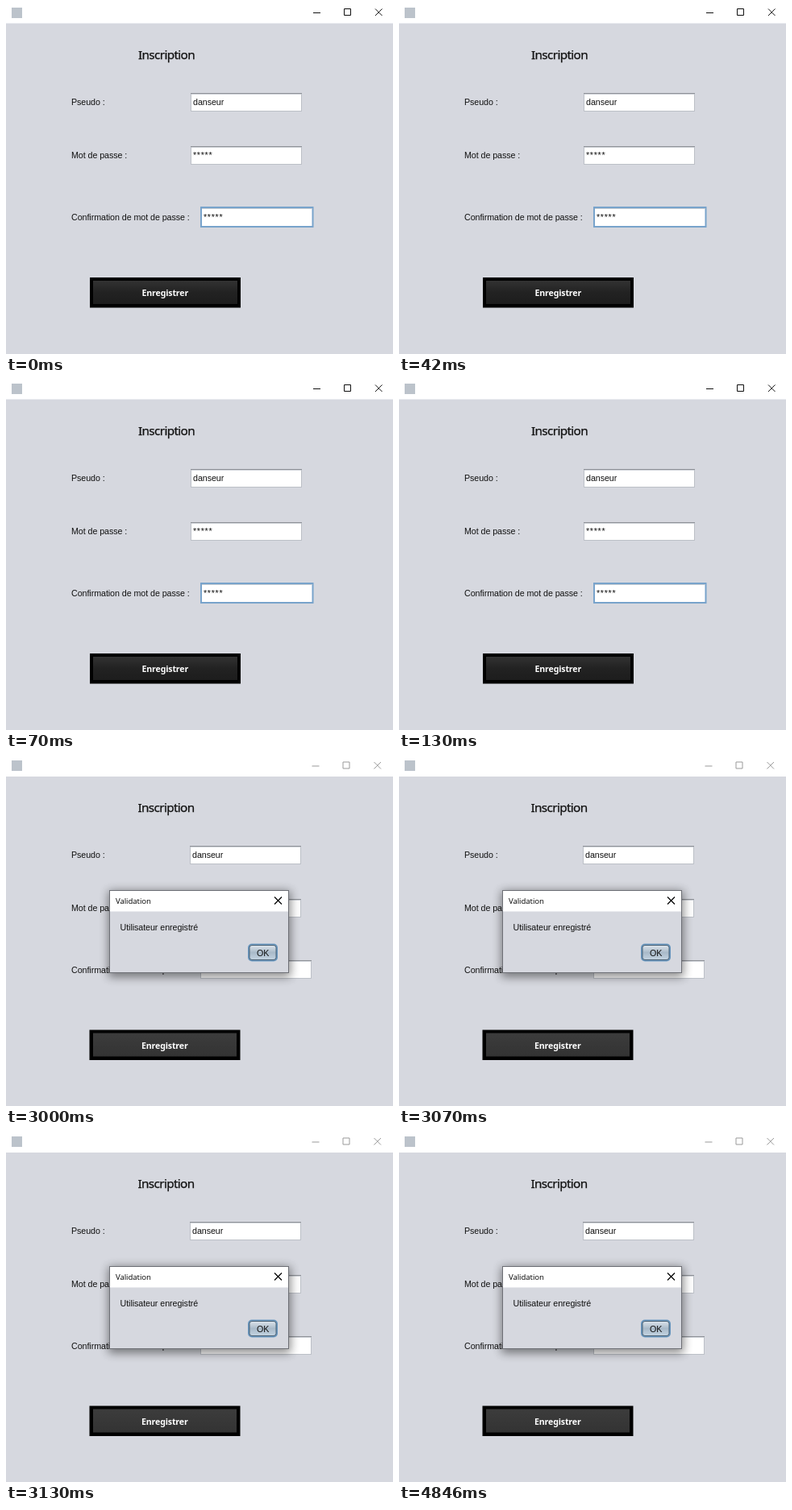
An HTML page for the animation above (5.99 s loop, 480 px wide and 432 px high).

```html
<!DOCTYPE html>
<html lang="fr">
<head>
<meta charset="utf-8">
<title>Inscription</title>
<style>
  html, body { margin: 0; width: 100%; height: 100%; overflow: hidden; background: #d6d8df; }
  svg { display: block; width: 480px; height: 432px; }
  text { font: 10.7px "Liberation Sans", Arial, sans-serif; letter-spacing: -.06px; fill: #111; white-space: pre; }
  .title { font: 15.3px "Noto Sans", "Open Sans", sans-serif; letter-spacing: -.65px; stroke: #111; stroke-width: .25px; }
  .action { font: bold 10.6px "Noto Sans", "Open Sans", sans-serif; letter-spacing: -.15px; fill: #fff; }
  .caption { font: 9.6px "Open Sans", "Noto Sans", sans-serif; fill: #000; }
  .secret { letter-spacing: .7px; }
  .controls { fill: none; stroke: #111; }
  .idle .controls { stroke: #999; }

  /* The dialog opens 3000 ms into the 5990 ms loop */
  .form { animation: form 5990ms step-end infinite; }
  .saved { animation: saved 5990ms step-end infinite; }
  @keyframes form { 0% { visibility: visible } 50.0835%, 100% { visibility: hidden } }
  @keyframes saved { 0% { visibility: hidden } 50.0835%, 100% { visibility: visible } }
</style>
</head>
<body>
<svg viewBox="0 0 480 432">
  <defs>
    <linearGradient id="pressed" x2="0" y2="1">
      <stop offset="0" stop-color="#323232"/>
      <stop offset=".5" stop-color="#222"/>
      <stop offset="1" stop-color="#1d1d1d"/>
    </linearGradient>
    <linearGradient id="released" x2="0" y2="1">
      <stop offset="0" stop-color="#3c3c3c"/>
      <stop offset="1" stop-color="#333"/>
    </linearGradient>
    <linearGradient id="ok" x2="0" y2="1">
      <stop offset="0" stop-color="#e3e9ef"/>
      <stop offset=".5" stop-color="#a9bac9"/>
      <stop offset="1" stop-color="#c6d6e4"/>
    </linearGradient>
    <filter id="shadow" x="-15%" y="-25%" width="130%" height="150%">
      <feGaussianBlur stdDeviation="6"/>
    </filter>
    <g id="field">
      <rect width="138" height="23" fill="#fff"/>
      <path d="M.5 1V23M137.5 1V23M0 22.5H138" stroke="#bcc0c7"/>
      <path d="M0 .5H138" stroke="#8e9197"/>
      <path d="M1 1.5H137" stroke="#d0d3d9"/>
    </g>
    <path id="controls" d="M381 8.5H390M419.5 3.5h8v8h-8zM458 3.5l8.5 8.5M466.5 3.5l-8.5 8.5"/>
  </defs>

  <g class="form">
    <rect width="480" height="432" fill="#d6d8df"/>
    <rect width="480" height="21.5" fill="#fff"/>
    <rect x="7" y="2" width="13" height="13" fill="#bcc3cb"/>
    <use href="#controls" class="controls"/>

    <text class="title" x="164" y="65.5">Inscription</text>
    <text x="81" y="123">Pseudo :</text>
    <text x="81" y="189">Mot de passe :</text>
    <text x="81" y="266">Confirmation de mot de passe :</text>

    <use href="#field" x="229" y="108"/>
    <text x="232" y="123">danseur</text>
    <use href="#field" x="229" y="174"/>
    <text class="secret" x="232" y="189">*****</text>
    <rect x="242" y="250" width="138.5" height="24" fill="#fff" stroke="#78a3cb" stroke-width="2"/>
    <path d="M243 251.5H380" stroke="#c3cad3"/>
    <text class="secret" x="245" y="266">*****</text>

    <rect x="104" y="337" width="187" height="37.5"/>
    <rect x="108" y="341" width="179" height="29" fill="url(#pressed)"/>
    <text class="action" x="168.5" y="360">Enregistrer</text>
  </g>

  <g class="saved idle">
    <rect width="480" height="432" fill="#d6d8df"/>
    <rect width="480" height="23" fill="#fff"/>
    <rect x="7" y="3" width="13" height="13" fill="#bcc3cb"/>
    <use href="#controls" class="controls" x="-1.5" y="1.5"/>

    <text class="title" x="163.5" y="66.5">Inscription</text>
    <text x="81" y="124">Pseudo :</text>
    <text x="81" y="190">Mot de passe :</text>
    <text x="81" y="267">Confirmation de mot de passe :</text>

    <use href="#field" x="228" y="109"/>
    <text x="231" y="124">danseur</text>
    <use href="#field" x="228" y="175"/>
    <use href="#field" x="241" y="251"/>

    <rect x="103.5" y="337.5" width="187" height="37.5"/>
    <rect x="108" y="341.5" width="178" height="29" fill="url(#released)"/>
    <text class="action" x="168" y="360.5">Enregistrer</text>

    <rect x="127" y="165" width="226" height="107" opacity=".45" filter="url(#shadow)"/>
    <rect x="128.5" y="164.5" width="222" height="102" fill="#d6d8df" stroke="#6d6f75"/>
    <rect x="129" y="165" width="221" height="25.5" fill="#fff"/>
    <path d="M333 172.5l9 9M342 172.5l-9 9" stroke="#000" stroke-width="1.2"/>
    <text class="caption" x="136" y="181">Validation</text>
    <text x="141.5" y="214">Utilisateur enregistré</text>
    <rect x="301" y="231.5" width="35" height="20" rx="4" fill="url(#ok)" stroke="#6795bd" stroke-width="2"/>
    <rect x="302" y="232.5" width="33" height="18" rx="3" fill="none" stroke="#4d6375"/>
    <text x="311" y="246">OK</text>
  </g>
</svg>
</body>
</html>
```
